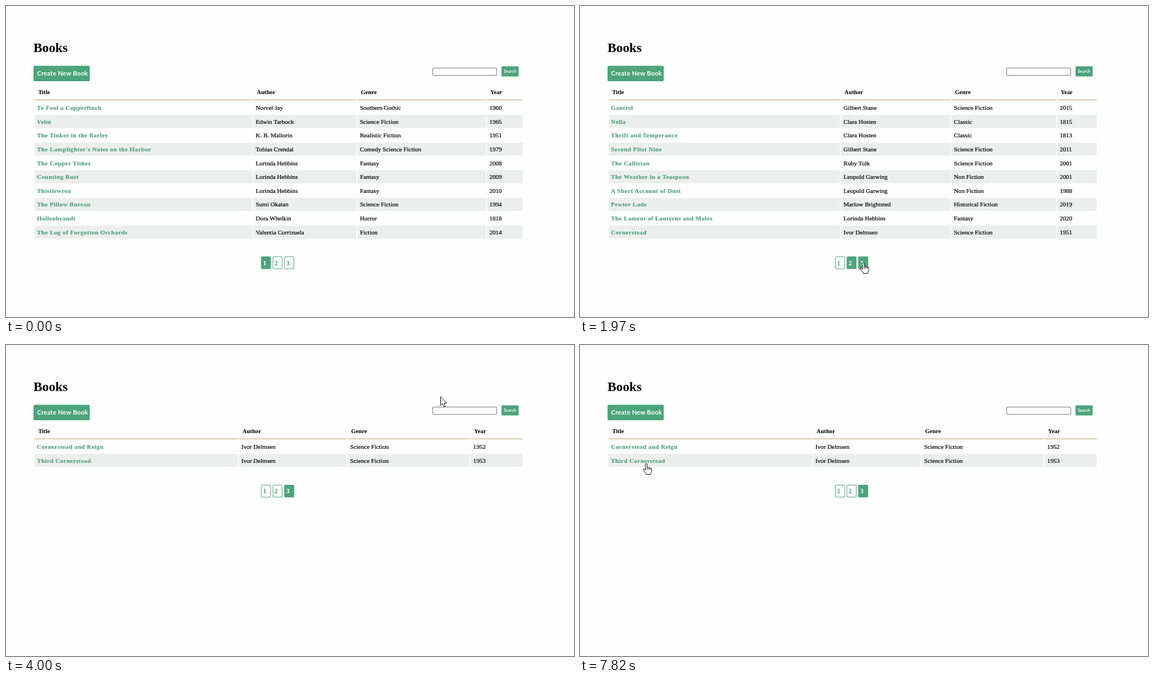
An HTML page for the animation above (8000 ms loop, 1011 px wide and 554 px high).

```html
<!DOCTYPE html>
<html lang="en">
<head>
<meta charset="utf-8">
<title>Books</title>
<style>
  html, body { margin: 0; width: 100%; height: 100%; overflow: hidden; background: #fefefe; }
  svg { display: block; width: 100%; height: 100%; }
  text { font-family: "Liberation Serif", "Times New Roman", serif; font-size: 11.1px; white-space: pre; }
  .cell { fill: #000; stroke: #000; stroke-width: .22px; }
  .head { font-size: 10.7px; font-weight: bold; }
  .title { font-size: 11px; font-weight: bold; letter-spacing: .45px; fill: #4a9f7a; stroke: #4a9f7a; stroke-width: .15px; }
  .heading { font-size: 23.3px; font-weight: bold; }
  .button { font-family: Lato, sans-serif; font-weight: bold; fill: #fff; }
  .page { font-size: 11.5px; font-weight: bold; }
</style>
</head>
<body>
<svg id="stage" viewBox="0 0 1011 554" preserveAspectRatio="none">
  <rect width="1011" height="554" fill="#fefefe"/>
  <text class="heading" x="49" y="82">Books</text>
  <rect x="49" y="106.5" width="100" height="27.5" rx="2" fill="#4ba47b"/>
  <text class="button" x="55.3" y="124.2" font-size="11.2" style="font-size:11.2px;letter-spacing:.2px">Create New Book</text>
  <rect x="882" y="107.5" width="30.5" height="18" rx="1.5" fill="#4ba47b"/>
  <text class="button" x="886" y="119" style="font-size:7.4px">Search</text>
  <rect id="field" x="759.5" y="110.5" width="114" height="13" rx="1.5" fill="#fff"/>
  <path id="caret" d="M762.5 112v10" stroke="#333" stroke-width="1"/>
  <g id="tables"></g>
  <g id="pager"></g>
  <g id="cursor">
    <path id="arrow" d="M.5 .5V16.3L4.1 12.9L6.7 18.6L9.1 17.5L6.6 12H11.6Z" fill="#fff" stroke="#111"/>
    <path id="hand" d="M-1.6 12V1.9Q-1.4 .4 0 .4Q1.4 .4 1.6 1.9V7.2Q3.2 6 4.4 7.7Q6 6.8 7 8.4Q9.3 7.7 9.5 10V14Q9.2 16.2 7.8 17.6V19.5H-.5V18Q-3.4 15 -5.5 11.4Q-5.7 9.4 -3.7 9.6ZM1.6 7.2V11M4.4 7.7V11M7 8.4V11"
      fill="#fff" stroke="#111" stroke-linejoin="round"/>
    <path id="beam" d="M-4 -7.5H-1L0 -6.8L1 -7.5H4M0 -7V7M-4 7.5H-1L0 6.8L1 7.5H4" fill="none" stroke="#000" stroke-width="1.6"/>
  </g>
</svg>
<script>
const LOOP = 8000, ROW = 24.64, GREEN = '#4ba47b';
const $ = id => document.getElementById(id);

function add(parent, tag, attrs, content = '') {
  const node = document.createElementNS('http://www.w3.org/2000/svg', tag);
  for (const key in attrs) node.setAttribute(key, attrs[key]);
  node.textContent = content;
  parent.append(node);
  return node;
}

const pages = [
  { columns: [51, 440, 625.3, 855.8], rows: [
    'To Fool a Copperfinch|Norvel Jay|Southern Gothic|1960',
    'Velm|Edwin Tarbock|Science Fiction|1965',
    'The Tinker in the Barley|K. B. Mallorin|Realistic Fiction|1951',
    "The Lamplighter's Notes on the Harbor|Tobias Crendal|Comedy Science Fiction|1979",
    'The Copper Tithes|Lorinda Hebbins|Fantasy|2008',
    'Counting Rust|Lorinda Hebbins|Fantasy|2009',
    'Thistlewren|Lorinda Hebbins|Fantasy|2010',
    'The Pillow Bureau|Sumi Okatan|Science Fiction|1994',
    'Hollenbrandt|Dora Whelkin|Horror|1818',
    'The Log of Forgotten Orchards|Valentia Corrizuela|Fiction|2014'] },
  { columns: [51, 464.4, 661, 849.3], rows: [
    'Gantrel|Gilbert Stane|Science Fiction|2015',
    'Nella|Clara Hosten|Classic|1815',
    'Thrift and Temperance|Clara Hosten|Classic|1813',
    'Second Pilot Nine|Gilbert Stane|Science Fiction|2011',
    'The Callistan|Ruby Tolk|Science Fiction|2001',
    'The Weather in a Teaspoon|Leopold Garwing|Non Fiction|2001',
    'A Short Account of Dust|Leopold Garwing|Non Fiction|1988',
    'Pewter Lads|Marlow Brightsted|Historical Fiction|2019',
    'The Lament of Lanterns and Moles|Lorinda Hebbins|Fantasy|2020',
    'Cornerstead|Ivor Delmsen|Science Fiction|1951'] },
  { columns: [51, 414.5, 608, 827], rows: [
    'Cornerstead and Reign|Ivor Delmsen|Science Fiction|1952',
    'Third Cornerstead|Ivor Delmsen|Science Fiction|1953'] }
];

function buildTable({ columns, rows }) {
  const group = add($('tables'), 'g', {});
  const widths = columns.map((x, i) => (columns[i + 1] - 1.6 || 919.7) - x);
  ['Title', 'Author', 'Genre', 'Year'].forEach((label, i) => {
    add(group, 'text', { class: 'head', x: columns[i] + 6.2, y: 157.3 }, label);
    add(group, 'rect', { x: columns[i], y: 166.6, width: widths[i], height: 1.1, fill: '#c0a56e' });
  });
  rows.forEach((row, r) => row.split('|').forEach((value, i) => {
    if (r % 2) add(group, 'rect', {
      x: columns[i], y: 169.4 + r * ROW, width: widths[i], height: 23.2, fill: '#eceeed' });
    add(group, 'text', {
      class: i ? 'cell' : 'title', x: columns[i] + (i ? 4.6 : 4), y: 185 + r * ROW }, value);
  }));
  return group;
}

const tables = pages.map(buildTable);
const buttons = [0, 1, 2].map(i => {
  const x = 454.4 + i * 20.7;
  return {
    box: add($('pager'), 'rect', { x, y: 446.7, width: 16.6, height: 21.4, rx: 1, stroke: GREEN }),
    label: add($('pager'), 'text', { class: 'page', x: x + 3, y: 461.6 }, i + 1)
  };
});

// Pointer stops: time, x, y; the pointer eases between them.
const stops = [
  [140, 813, 331], [830, 484, 459], [1300, 484, 459], [1370, 485.5, 459.5],
  [1770, 504.5, 457], [2430, 504.5, 457], [2490, 503, 460], [3050, 503, 460],
  [3180, 697, 281], [3790, 697, 281], [4000, 773, 91.5], [4270, 817, 117],
  [6620, 817, 117], [7420, 117.5, 211], [7480, 118, 211], [LOOP, 118, 211]
];

function pointerAt(t) {
  const i = Math.max(1, stops.findIndex(stop => stop[0] > t));
  const [t0, x0, y0] = stops[i - 1], [t1, x1, y1] = stops[i];
  const u = Math.max(0, Math.min(1, (t - t0) / (t1 - t0)));
  const k = u * u * (3 - 2 * u);
  return [x0 + (x1 - x0) * k, y0 + (y1 - y0) * k];
}

const inside = (x, y, left, top, right, bottom) => x >= left && x <= right && y >= top && y <= bottom;
const show = (node, visible) => node.setAttribute('visibility', visible ? 'visible' : 'hidden');

function render(t) {
  const page = t < 1970 ? 0 : t < 3590 ? 1 : 2;
  const clicked = page === 0 && t >= 1100 ? 1 : page === 1 && t >= 2630 ? 2 : -1;
  const pagerShift = page === 2 ? -8 * ROW : 0;
  const [x, y] = pointerAt(t);
  const present = t >= 140;

  tables.forEach((table, i) => show(table, i === page));
  $('pager').setAttribute('transform', `translate(0 ${pagerShift})`);

  let overLink = page === 2 && inside(x, y, 55, 199, 154, 213);
  buttons.forEach(({ box, label }, i) => {
    const left = 454 + i * 20.7, top = 446 + pagerShift;
    const hover = present && inside(x, y, left, top, left + 18, top + 22);
    const filled = hover || i === page || i === clicked;
    overLink ||= hover;
    box.setAttribute('fill', filled ? GREEN : '#fefefe');
    label.setAttribute('fill', filled ? '#fff' : '#4a9f7a');
  });

  const overField = present && inside(x, y, 759, 110, 874, 124);
  const focused = t >= 4540 && t < 7680;
  $('field').setAttribute('stroke', focused ? '#0b0b0b' : overField ? '#4f4f4f' : '#767676');
  $('field').setAttribute('stroke-width', focused ? 2 : 1);
  show($('caret'), focused && Math.floor((t - 4530) / 530) % 2 === 0);

  $('cursor').setAttribute('transform', `translate(${x} ${y})`);
  show($('hand'), present && overLink);
  show($('beam'), overField);
  show($('arrow'), present && !overLink && !overField);
}

const start = performance.now();
function frame() {
  render((performance.now() - start) % LOOP);
  requestAnimationFrame(frame);
}
render(0);
requestAnimationFrame(frame);
</script>
</body>
</html>
```
